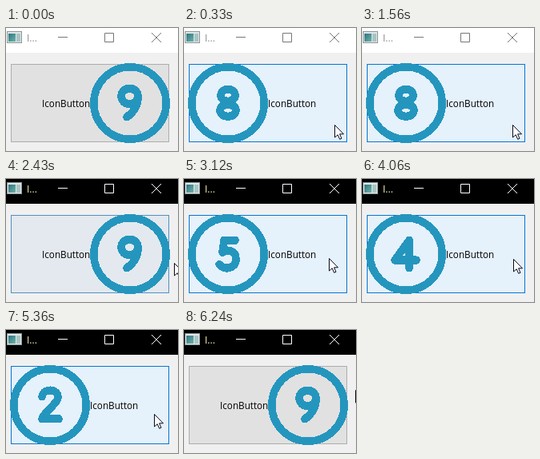
An HTML page for the animation above (6.31 s loop, 215 by 154 pixels).

```html
<!DOCTYPE html>
<html lang="en">
<head>
<meta charset="utf-8">
<title>IconButton</title>
<style>
  html, body { margin: 0; width: 100%; height: 100%; overflow: hidden; background: #f0f0f0; }
  svg { display: block; width: 215px; height: 154px; }
  text { font-family: "Open Sans", "Noto Sans", sans-serif; }
  .icon {
    fill: none; stroke: #2496be; stroke-width: 9.5;
    stroke-linecap: round; stroke-linejoin: round; shape-rendering: crispEdges;
  }
</style>
</head>
<body>
<svg viewBox="0 0 215 154">
  <defs>
    <linearGradient id="pane" x2="1" y2="1">
      <stop stop-color="#2f7484"/>
      <stop offset="1" stop-color="#6fb3a6"/>
    </linearGradient>
  </defs>
  <rect width="215" height="154" fill="#f0f0f0"/>
  <rect id="bar" width="215" height="31"/>

  <rect x="1.5" y="4.5" width="18" height="14" fill="#dfe7e7" stroke="#8b9696"/>
  <rect x="3" y="7" width="9" height="10" fill="url(#pane)"/>
  <rect x="13" y="7" width="5" height="10" fill="#a9c4c4"/>

  <text id="caption" x="26" y="17" font-size="12">I...</text>
  <path id="controls" fill="none" d="M65 11.5h12M123.5 6.5h11v11h-11zM182 6l12 12m0-12l-12 12"/>

  <rect id="button" x="6.5" y="45.5" width="197" height="97" shape-rendering="crispEdges"/>
  <text id="label" y="99" font-size="11.7">IconButton</text>
  <g id="icon" class="icon">
    <circle r="45.2"/>
    <path id="digit" transform="scale(1 1.08)"/>
  </g>
  <path id="cursor" fill="#fff" stroke="#0a0a1c" d="M.5 .5V16L4.2 12.7L6.7 18.3L9 17.3L6.6 11.8H11.5Z"/>
</svg>
<script>
const LOOP = 6310, FADE = 120;
const RIGHT = 204, BOTTOM = 143;
const ENTRANCE = [198, 156];
const PRESS = 1690, RELEASE = 1820;

const DIGITS = {
  2: "M-10-10C-8-20 10-19 10-9C10-2-8 8-10 16H11",
  3: "M-9-12C-6-18 10-19 10-9C10-3 3-2-2-2C4-2 11 0 11 7C11 18-5 19-10 12",
  4: "M4 16V-16L-14 7H13",
  5: "M9-16H-5L-7-2C-3-5 10-6 10 6C10 17-4 19-11 12",
  8: "M-9-9a9 7 0 1 1 18 0a9 7 0 1 1-18 0M-10 8.5a10 7 0 1 1 20 0a10 7 0 1 1-20 0",
  9: "M10-8a10.5 9 0 1 0-21 0a10.5 9 0 1 0 21 0C11 3 3 12-4 16"
};

// The pointer glides to its rest point while arriving and to its exit while departing.
const VISITS = [
  { arrive: [70, 330], rest: [188, 121], depart: [600, 820], exit: [217, 118], inside: 8, outside: 9 },
  { arrive: [820, 1220], rest: [188, 121], depart: [2220, 2500], exit: [217, 100], inside: 8, outside: 9 },
  { arrive: [2690, 3120], rest: [181, 99], depart: [3930, 4470], exit: [212, 102], inside: 5, outside: 3,
    change: { at: 3450, digit: 4 } },
  { arrive: [4880, 5360], rest: [185, 105], depart: [5690, 6240], exit: [214, 75], inside: 2, outside: 9 }
];

const el = id => document.getElementById(id);
const set = (id, attrs) => {
  for (const [name, value] of Object.entries(attrs)) el(id).setAttribute(name, value);
};
const clamp = p => Math.min(1, Math.max(0, p));
const mix = (a, b, p) => a + (b - a) * p;
const blend = (a, b, p) => `rgb(${a.map((v, i) => Math.round(mix(v, b[i], p)))})`;
const progress = ([start, end], t) => clamp((t - start) / (end - start));
const between = (a, b, p) => a.map((v, i) => mix(v, b[i], p));

// Moment at which a glide between an outer and an inner point crosses the button's edge.
function crossing([start, end], from, to) {
  const [axis, edge] = Math.max(from[0], to[0]) > RIGHT ? [0, RIGHT] : [1, BOTTOM];
  return mix(start, end, (edge - from[axis]) / (to[axis] - from[axis]));
}

VISITS.forEach((visit, i) => {
  visit.from = i ? VISITS[i - 1].exit : ENTRANCE;
  visit.before = i ? VISITS[i - 1].outside : 9;
  visit.enter = crossing(visit.arrive, visit.from, visit.rest);
  visit.leave = crossing(visit.depart, visit.rest, visit.exit);
});

function digitAt(visit, t) {
  if (t < visit.enter) return visit.before;
  if (t >= visit.leave) return visit.outside;
  return visit.change && t >= visit.change.at ? visit.change.digit : visit.inside;
}

function draw(t) {
  const visit = VISITS.findLast(v => v.arrive[0] <= t) || VISITS[0];
  const { from, rest, exit, enter, leave } = visit;
  const hovered = t >= enter && t < leave;
  const glow = clamp((t - enter) / FADE) - clamp((t - leave) / FADE);
  const arrived = between(from, rest, progress(visit.arrive, t));
  const pointer = between(arrived, exit, progress(visit.depart, t)).map(Math.round);
  const focused = t >= PRESS;
  const pressed = focused && t < RELEASE;

  set("bar", { fill: focused ? "#000" : "#fff" });
  set("caption", { fill: focused ? "#fffbb0" : "#8c8c8c" });
  set("controls", { stroke: focused ? "#fff" : "#777" });
  set("button", {
    fill: pressed ? "#cce4f7" : blend([225, 225, 225], [229, 241, 251], glow),
    stroke: pressed ? "#005499" : blend([173, 173, 173], [0, 120, 215], glow)
  });
  set("label", { x: hovered ? 105 : 45 });
  set("icon", { transform: `translate(${hovered ? 55 : 155} 94)` });
  set("digit", { d: DIGITS[digitAt(visit, t)] });
  set("cursor", { transform: `translate(${pointer})` });
}

function frame() {
  draw(performance.now() % LOOP);
  requestAnimationFrame(frame);
}
frame();
</script>
</body>
</html>
```
